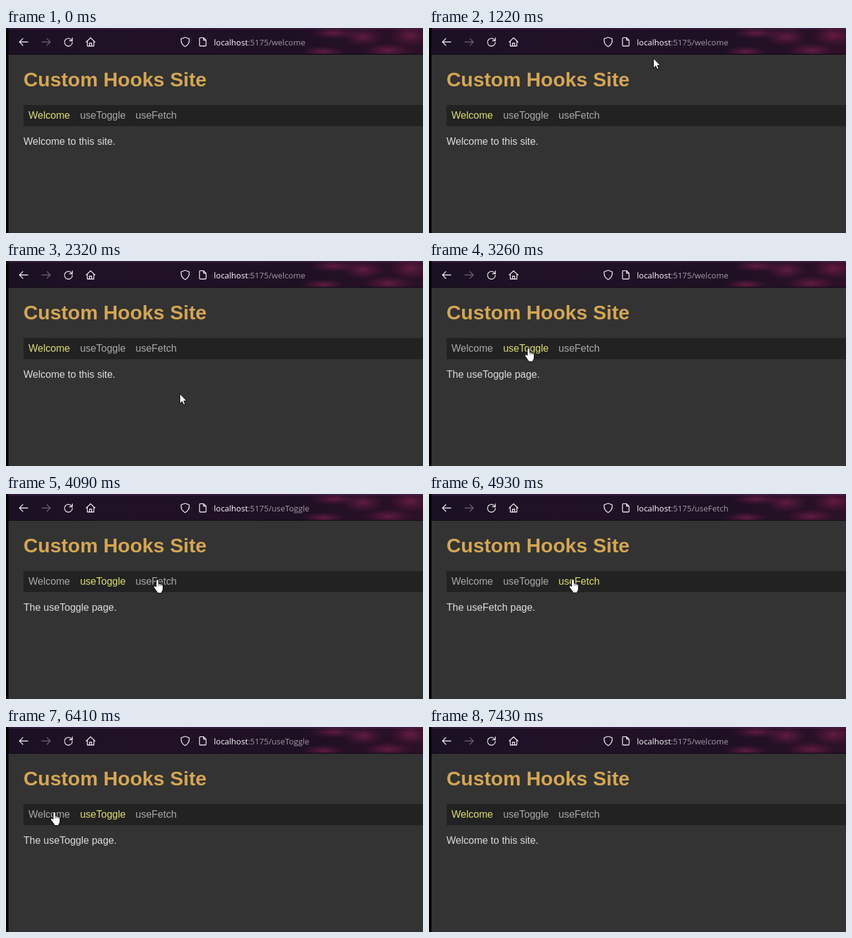
An HTML page for the animation above (8.43 s loop, 668 by 330 pixels).

```html
<!DOCTYPE html>
<html lang="en">
<head>
<meta charset="utf-8">
<title>Custom Hooks Site</title>
<style>
  html, body { margin: 0; width: 100%; height: 100%; overflow: hidden; background: #333; }
  svg { display: block; width: 668px; height: 330px; }
  text { white-space: pre; }

  .page, .url, .cursor { animation: 8430ms step-end infinite; }
  .page { animation-name: page; font: 16px "Liberation Sans", Arial, sans-serif; fill: #ddd; }
  .url { animation-name: url; font: 13px "Open Sans", "Noto Sans", sans-serif; fill: #a19aa6; }
  .cursor { animation-name: cursor; }

  h1, .title { font-weight: bold; font-size: 32px; fill: #d4a653; }
  .host { fill: #fbfbfe; }
  .icon { fill: none; stroke: #f0edf2; stroke-width: 1.3; stroke-linecap: round; stroke-linejoin: round; }
  .off { stroke: #6b6170; }

  /* Visibility of each route */
  .welcome { --on: var(--w); }
  .toggle { --on: var(--t); }
  .fetch { --on: var(--f); }
  .route { opacity: var(--on); }
  .link { fill: color-mix(in srgb, #dfdf70 calc(var(--on) * 100%), #aaa); }

  @keyframes page {
    0%, 79.83%, 100% { --w: 1; --t: 0; --f: 0; }
    38.67%, 69.98% { --w: 0; --t: 1; --f: 0; }
    54.92% { --w: 0; --t: 0; --f: 1; }
  }
  @keyframes url {
    0%, 79.83%, 100% { --w: 1; --t: 0; --f: 0; }
    40.45%, 69.98% { --w: 0; --t: 1; --f: 0; }
    54.92% { --w: 0; --t: 0; --f: 1; }
  }

  .arrow { opacity: calc(1 - var(--hand)); }
  .hand { opacity: var(--hand); }
  .arrow, .hand { fill: #fff; stroke: #000; }
  @keyframes cursor {
    0% { transform: translate(-99px, 0); --hand: 0; }
    8.06% { transform: translate(464px, 192px); --hand: 0; }
    9.48% { transform: translate(412px, 133px); --hand: 0; }
    10.91% { transform: translate(381px, 94px); --hand: 0; }
    12.69% { transform: translate(363px, 50px); --hand: 0; }
    14.47% { transform: translate(359px, 48px); --hand: 0; }
    16.36% { transform: translate(425px, 47px); --hand: 0; }
    17.79% { transform: translate(476px, 46px); --hand: 0; }
    19.57% { transform: translate(477px, 46px); --hand: 0; }
    22.89% { transform: translate(480px, 92px); --hand: 0; }
    24.31% { transform: translate(481px, 180px); --hand: 0; }
    26.09% { transform: translate(372px, 233px); --hand: 0; }
    27.52% { transform: translate(278px, 213px); --hand: 0; }
    29.29% { transform: translate(238px, 190px); --hand: 0; }
    30.72% { transform: translate(200px, 166px); --hand: 0; }
    32.14% { transform: translate(164px, 144px); --hand: 1; }
    33.57% { transform: translate(153px, 139.5px); --hand: 1; }
    44% { transform: translate(168px, 138px); --hand: 1; }
    45.43% { transform: translate(200px, 136px); --hand: 1; }
    46.97% { transform: translate(228px, 136px); --hand: 1; }
    48.51% { transform: translate(236px, 137px); --hand: 1; }
    58.48% { transform: translate(224px, 136.5px); --hand: 1; }
    59.9% { transform: translate(200px, 136px); --hand: 1; }
    61.32% { transform: translate(181px, 137px); --hand: 1; }
    63.1% { transform: translate(170px, 137px); --hand: 1; }
    71.41% { transform: translate(128px, 137px); --hand: 1; }
    72.83% { transform: translate(91px, 136px); --hand: 1; }
    74.61% { transform: translate(77px, 136px); --hand: 1; }
    76.03% { transform: translate(71px, 136px); --hand: 1; }
    84.57% { transform: translate(76px, 154px); --hand: 1; }
    86.35% { transform: translate(178px, 286px); --hand: 0; }
    88.13%, 100% { transform: translate(-99px, 0); --hand: 0; }
  }
</style>
</head>
<body>
<svg viewBox="0 0 668 330">
  <defs>
    <linearGradient id="bar">
      <stop offset="0" stop-color="#1b1023"/>
      <stop offset=".3" stop-color="#201127"/>
      <stop offset=".7" stop-color="#1e1024"/>
      <stop offset="1" stop-color="#2c1027"/>
    </linearGradient>
    <radialGradient id="glow">
      <stop offset="0" stop-color="#8a2354" stop-opacity=".6"/>
      <stop offset="1" stop-color="#6a1a48" stop-opacity="0"/>
    </radialGradient>
    <clipPath id="barArea"><path d="M0 0H668V42H0Z"/></clipPath>
  </defs>

  <rect width="668" height="330" fill="#333"/>

  <!-- Browser toolbar -->
  <g clip-path="url(#barArea)">
    <rect width="668" height="42" fill="url(#bar)"/>
    <g fill="url(#glow)">
      <ellipse cx="508" cy="38" rx="36" ry="9"/>
      <ellipse cx="525" cy="8" rx="40" ry="10"/>
      <ellipse cx="572" cy="14" rx="34" ry="16"/>
      <ellipse cx="612" cy="36" rx="40" ry="12"/>
      <ellipse cx="648" cy="12" rx="34" ry="18"/>
    </g>
    <path d="M0 1.5H668" stroke="#4b2757"/>
  </g>
  <path d="M0 42.5H668" stroke="#0d0710"/>
  <rect width="4" height="330" fill="#000"/>

  <g class="icon">
    <path d="M35 22.5H21.5M27 17L21.5 22.5L27 28"/>
    <path class="off" d="M57.5 22.5H71M65.500 17L71 22.500L65.500 28"/>
    <path d="M105.300 19.500A6.300 6.300 0 1 0 106.300 23M106.300 16V20.500H101.800"/>
    <path d="M128.500 22.500L135.500 15.800L142.500 22.500M130.300 21V29H140.700V21M133.700 29V24.500H137.300V29"/>
    <path d="M287 15L293.500 17.300C294 23 292 27.500 287 30C282 27.500 280 23 280.500 17.300Z"/>
    <path d="M310 17Q310 15.700 311.300 15.700H316.500L320.500 19.700V27.700Q320.500 29 319.200 29H311.300Q310 29 310 27.700ZM316.500 15.700V19.700H320.500"/>
  </g>

  <g class="url">
    <text class="route welcome" x="333" y="28"><tspan class="host">localhost</tspan>:5175/welcome</text>
    <text class="route toggle" x="333" y="28"><tspan class="host">localhost</tspan>:5175/useToggle</text>
    <text class="route fetch" x="333" y="28"><tspan class="host">localhost</tspan>:5175/useFetch</text>
  </g>

  <!-- Site -->
  <g class="page">
    <text class="title" x="28" y="94">Custom Hooks Site</text>
    <rect x="28" y="124" width="640" height="34" fill="#222"/>
    <text class="link welcome" x="36" y="146">Welcome</text>
    <text class="link toggle" x="118.700" y="146">useToggle</text>
    <text class="link fetch" x="207.500" y="146">useFetch</text>
    <text class="route welcome" x="28" y="188">Welcome to this site.</text>
    <text class="route toggle" x="28" y="188">The useToggle page.</text>
    <text class="route fetch" x="28" y="188">The useFetch page.</text>
  </g>

  <g class="cursor">
    <path class="arrow" d="M.5 .8V16.800L4.200 13.200L6.600 18.500L9.100 17.400L6.800 12.200H11.600Z"/>
    <g class="hand">
      <path d="M6.500 .7Q8.600 .7 8.600 2.800V7.400Q10 6.700 10.900 8Q12.300 7.300 13.200 8.800Q15.500 8.300 15.500 10.700V16Q15.500 18.200 14.200 19.600Q13.500 20.500 13.500 22.500H6.500Q6.300 20.500 4.500 18.500L1 13.800Q0 11.700 1.500 11Q2.800 10.600 4.400 12.400V2.800Q4.400 .7 6.500 .7Z"/>
      <path d="M8.600 7.400V11M10.900 8V11.300M13.200 8.800V11.600" stroke-width=".6"/>
    </g>
  </g>
</svg>
</body>
</html>
```
